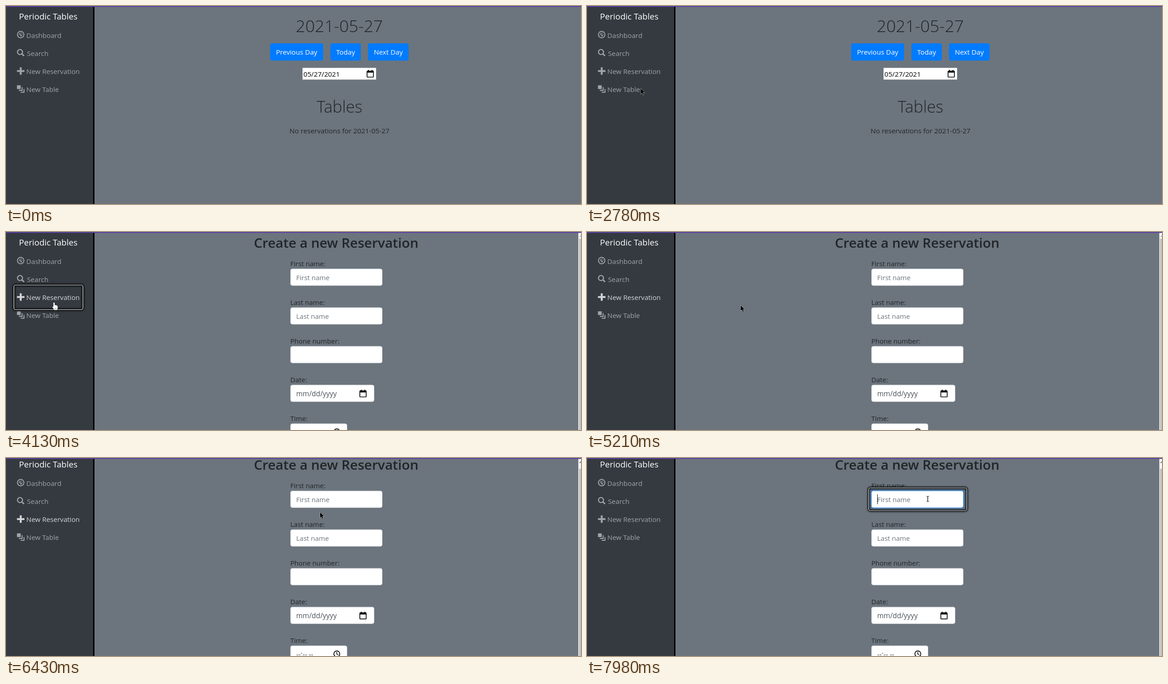
These frames come from a looping animation (1274x440 px, 8 s). An HTML page with a canvas:

```html
<!DOCTYPE html>
<html lang="en">
<head>
<meta charset="utf-8">
<title>Periodic Tables</title>
<style>
html, body { margin: 0; width: 100%; height: 100%; overflow: hidden; background: #6c757d; }
canvas { display: block; }
</style>
</head>
<body>
<canvas id="stage" width="1274" height="440"></canvas>
<script>
const LOOP = 8000, INK = '#212529', MUTED = '#6c757d', NAV = '#a2a4a7', NAV_ON = '#d6d7d9';
const ctx = document.getElementById('stage').getContext('2d');

// Cursor moves: start, end, number of steps, cubic Bezier points
const MOVES = [
  [1190, 1530, 6, [1275, 448], [1080, 415], [920, 405], [903, 404]],
  [1780, 2570, 13, [903, 404], [640, 414], [309, 408], [138, 207]],
  [2640, 3200, 9, [138, 207], [115, 180], [107, 160], [107, 156]],
  [4860, 5620, 12, [107, 156], [220, 155], [480, 165], [521, 184]],
  [6160, 6920, 11, [521, 184], [750, 112], [771, 75], [755, 91]]
];

const ICONS = {
  plus: new Path2D('M3 0v3h-3v2h3v3h2v-3h3v-2h-3v-3h-2z'),
  layers: new Path2D('M0 0v4h4v-4h-4zm5 2v3h-3v1h4v-4h-1zm2 2v3h-3v1h4v-4h-1z')
};
const ARROW = new Path2D('M0 0V12.2L2.7 9.6L4.7 14.2L6.7 13.3L4.7 8.9H8.4Z');
const HAND = new Path2D('M-1.6 1Q0 -1 1.4 1V6Q3 5 4 6.4Q5.4 5.6 6.2 7Q8 6.6 8 8.6V12Q8 14 6.6 17H0.4Q-1.8 13 -3.8 10.4Q-3.8 8.4 -1.6 10.2Z');

const clamp = v => Math.max(0, Math.min(1, v));

// Progress of a stepped change; the first step already moves
function stepped(t, start, end, n) {
  if (t < start) return 0;
  return Math.min(1, (Math.floor((t - start) * (n - 1) / (end - start) + 1e-6) + 1) / n);
}

function bezier(p, a, b, c, d) {
  const q = 1 - p;
  return [0, 1].map(i => q * q * q * a[i] + 3 * q * q * p * b[i] + 3 * q * p * p * c[i] + p * p * p * d[i]);
}

function text(str, x, y, size, color, weight = 400, align = 'left') {
  ctx.font = `${weight} ${size}px "Open Sans", "Noto Sans", sans-serif`;
  ctx.textAlign = align;
  ctx.fillStyle = color;
  ctx.fillText(str, x, y);
}

function rect(x, y, w, h, color) {
  ctx.fillStyle = color;
  ctx.fillRect(x, y, w, h);
}

function box(x, y, w, h, r, fill, stroke, line = 1) {
  ctx.beginPath();
  ctx.roundRect(x, y, w, h, r);
  if (fill) { ctx.fillStyle = fill; ctx.fill(); }
  if (stroke) { ctx.strokeStyle = stroke; ctx.lineWidth = line; ctx.stroke(); }
}

function circle(x, y, r, fill, stroke, line) {
  ctx.beginPath();
  ctx.arc(x, y, r, 0, 7);
  if (fill) { ctx.fillStyle = fill; ctx.fill(); }
  if (stroke) { ctx.strokeStyle = stroke; ctx.lineWidth = line; ctx.stroke(); }
}

function lines(points, color, width) {
  ctx.beginPath();
  points.forEach(([x, y], i) => i ? ctx.lineTo(x, y) : ctx.moveTo(x, y));
  ctx.strokeStyle = color;
  ctx.lineWidth = width;
  ctx.stroke();
}

function icon(path, x, y, scale, color) {
  ctx.save();
  ctx.translate(x, y);
  ctx.scale(scale, scale);
  ctx.fillStyle = color;
  ctx.fill(path);
  ctx.restore();
}

function calendar(x, y) {
  box(x + 1, y + 2.5, 14, 13.5, 1, null, '#000', 1.7);
  rect(x + 1, y + 2, 14, 4, '#000');
  rect(x + 3, y, 2, 3, '#000');
  rect(x + 11, y, 2, 3, '#000');
}

function focusRing(x, y, w, h, alpha) {
  if (alpha <= 0) return;
  ctx.save();
  ctx.globalAlpha = alpha;
  ctx.shadowColor = '#000';
  ctx.shadowBlur = 4;
  box(x, y, w, h, 4, null, '#0b0c0e', 4);
  ctx.shadowBlur = 0;
  box(x, y, w, h, 4, null, '#fff', 1.2);
  ctx.restore();
}

function sidebar(t, active) {
  rect(0, -20, 193, 480, '#343a40');
  rect(193, -20, 3, 480, '#000');
  text('Periodic Tables', 28.8, 30, 18.6, '#fff');

  circle(32.5, 63.5, 7.2, null, NAV, 2);
  [[29.3, 63.5], [30.5, 60.8], [33.5, 59.8], [35.8, 62.5]].forEach(([x, y]) => circle(x, y, 1, NAV));
  lines([[30.5, 61.5], [33.5, 65.5]], NAV, 1.6);
  circle(33.5, 66, 1.8, NAV);
  text('Dashboard', 45, 70.5, 15.1, NAV);

  circle(31, 102.3, 5.6, null, NAV, 2.3);
  lines([[35, 106], [40, 111]], NAV, 3);
  text('Search', 46.5, 110.5, 15.1, NAV);

  const on = active ? NAV_ON : NAV;
  icon(ICONS.plus, 24.3, 136.2, 2.08, on);
  text('New Reservation', 45, 151, 15.1, on);

  icon(ICONS.layers, 24.3, 176.2, 2.08, NAV);
  text('New Table', 45, 191, 15.1, NAV);

  focusRing(17.5, 118, 153, 54.5, Math.min(clamp((t - 3790) / 130), clamp((5100 - t) / 240)));
}

function dashboard() {
  text('2021-05-27', 738.5, 58.3, 37, INK, 300, 'center');
  [['Previous Day', 585.3, 117.3], ['Today', 718.7, 67.3], ['Next Day', 802, 90]].forEach(([label, x, w]) => {
    box(x, 83, w, 38.3, 4, '#007bff');
    text(label, x + w / 2, 108, 15.2, '#fff', 400, 'center');
  });
  rect(657, 137.5, 163, 26, '#fff');
  text('05/27/2021', 659, 157, 15.2, '#000');
  calendar(799, 142);
  text('Tables', 739, 236.5, 36, INK, 300, 'center');
  text('No reservations for 2021-05-27', 738.8, 283, 15.3, INK, 400, 'center');
}

function form(t) {
  const focus = clamp((t - 6960) / 150);
  text('Create a new Reservation', 731.5, 34.5, 29.7, INK, 600, 'center');
  const rows = [
    ['First name:', 204, 'First name'],
    ['Last name:', 204, 'Last name'],
    ['Phone number:', 204, ''],
    ['Date:', 186, 'mm/dd/yyyy'],
    ['Time:', 126, '--:-- --']
  ];
  rows.forEach(([label, w, hint], i) => {
    const y = 70 + i * 86, focused = i === 0 && focus > 0;
    text(label, 630, y + 5.5, 15, INK);
    if (focused) {
      focusRing(624, 75.3, 217.5, 50.5, focus);
      box(626.8, y + 8.3, w + 6.4, 44, 6, `rgba(0,123,255,${0.25 * focus})`);
    }
    box(630.5, y + 12, w - 1, 37, 4, '#fff', focused ? '#80bdff' : '#ced4da');
    text(hint, 643, y + 37, i > 2 ? 15.4 : 15, i > 2 ? '#495057' : MUTED);
  });
  calendar(783, 350.5);
  circle(733, 444, 6.6, null, '#000', 1.7);
  lines([[733, 439.5], [733, 444.5], [736, 446.5]], '#000', 1.5);
  const caret = t >= 6990 && t < 7450 || t >= 7980;
  if (caret) rect(643, 89.5, 1, 22, '#000');
}

function scrollbar(scroll) {
  rect(1268, 2, 6, 438, '#f1f1f1');
  rect(1269.5, 15 + scroll, 4.5, 440, '#c1c1c1');
  lines([[1271, 11], [1274, 8]], scroll ? '#505050' : '#a3a3a3', 1.5);
}

function cursor(t, [x, y], onLink) {
  const clicking = [3730, 6990].some(c => t >= c && t < c + 130);
  if (clicking) circle(x - 0.5, y + 1.5, 9.7, 'rgba(190,180,20,.78)');
  if (t >= 6160 && y < 110 && x > 630) {
    lines([[x - 3, y - 6], [x - 1, y - 6], [x, y - 5], [x, y + 5], [x - 1, y + 6], [x - 3, y + 6]], '#222', 1);
    lines([[x + 3, y - 6], [x + 1, y - 6], [x, y - 5], [x, y + 5], [x + 1, y + 6], [x + 3, y + 6]], '#222', 1);
    return;
  }
  ctx.save();
  ctx.translate(x - 0.5, y + 0.5);
  ctx.lineJoin = 'round';
  ctx.lineWidth = 1;
  ctx.fillStyle = onLink ? '#fff' : '#000';
  ctx.strokeStyle = onLink ? '#000' : '#e4e6e8';
  const shape = onLink ? HAND : ARROW;
  ctx.stroke(shape);
  ctx.fill(shape);
  if (onLink) [2, 4.6].forEach(d => lines([[d, 12], [d, 15]], '#555', 0.8));
  ctx.restore();
}

function draw(t) {
  const move = MOVES.filter(m => t >= m[0]).pop();
  const pos = move && bezier(stepped(t, move[0], move[1], move[2]), ...move.slice(3));
  const onLink = !!pos && pos[0] < 171 && pos[1] > 125 && pos[1] < 166;
  const active = (onLink || t > 3800) && t < 6990;
  const onForm = t >= 3930;
  const scroll = 8.8 * stepped(t, 5690, 5900, 4);

  rect(0, 0, 1274, 440, MUTED);
  ctx.save();
  ctx.translate(0, -scroll);
  if (onForm) form(t); else dashboard();
  sidebar(t, active);
  ctx.restore();
  if (onForm) scrollbar(scroll);
  rect(0, 0, 1274, 2, '#5a3fa3');
  if (pos) cursor(t, pos, onLink);
}

function frame(now) {
  draw(now % LOOP);
  requestAnimationFrame(frame);
}
requestAnimationFrame(frame);
</script>
</body>
</html>
```
